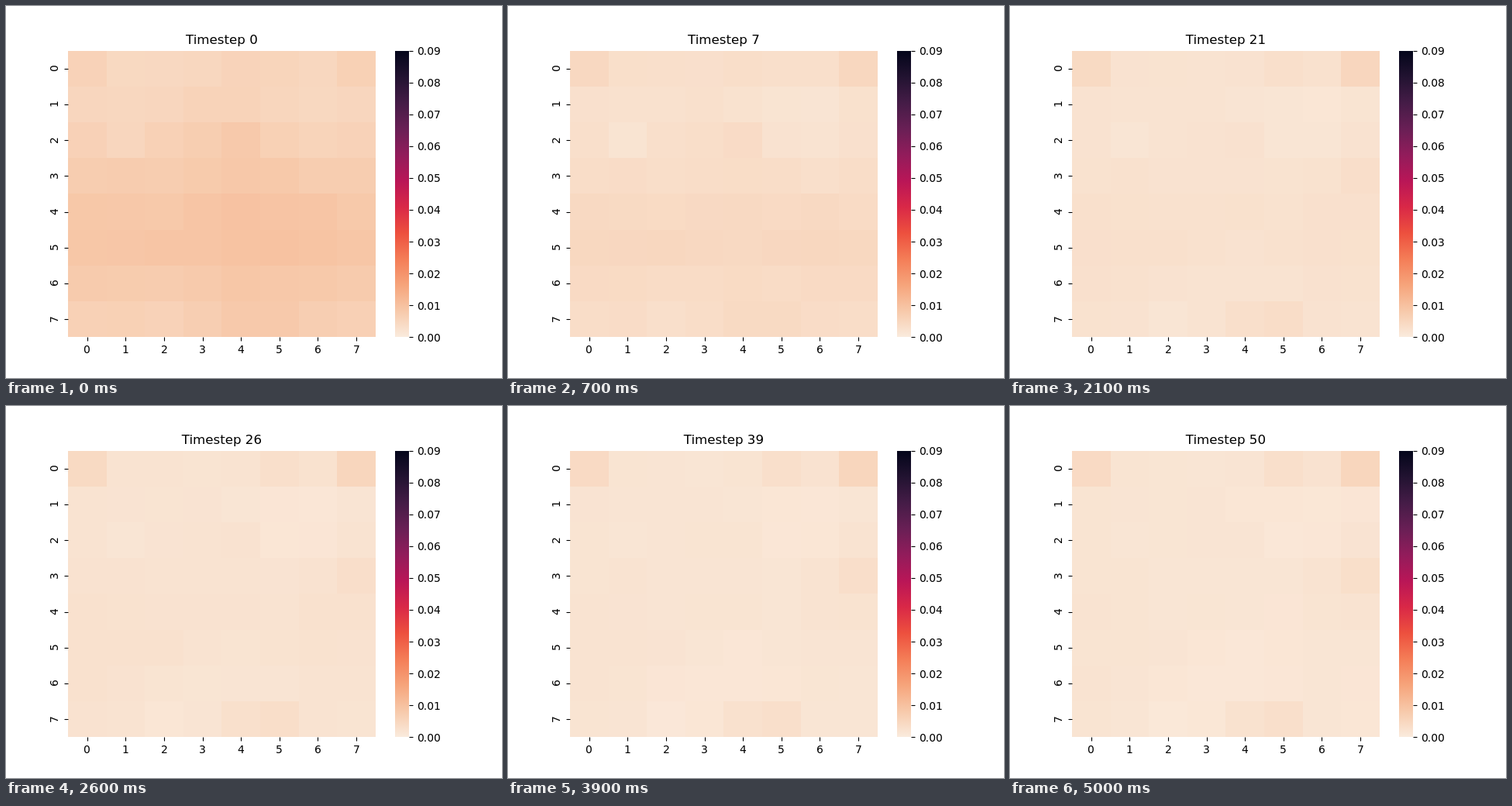
An HTML page that plays this animation: 640x480 px, repeating every 5100 ms.

```html
<!DOCTYPE html>
<html lang="en">
<head>
<meta charset="utf-8">
<title>Heatmap over time</title>
<style>
  html, body { margin: 0; width: 100%; height: 100%; overflow: hidden; background: #fff; }
  svg { display: block; font-family: "DejaVu Sans", sans-serif; font-size: 13.889px; }
</style>
</head>
<body>
<svg id="stage" width="640" height="480" viewBox="0 0 640 480">
  <defs><linearGradient id="scale" x1="0" y1="1" x2="0" y2="0"></linearGradient></defs>
  <rect width="640" height="480" fill="#fff"/>
  <text id="title" x="278.4" y="49" text-anchor="middle" font-size="16.667"></text>
</svg>
<script>
const N = 8, LAST = 50, BEND = 7, STEP = 100;
const X0 = 80, Y0 = 57.6, CW = 49.6, CH = 46.2, VMAX = 90;
const HALF_DIGIT = 4.42;
const svg = document.getElementById("stage");
const title = document.getElementById("title");

// Colour scale from light (0) to dark (1), evenly spaced
const ramp = ["faebdd", "f7c9aa", "f6a47b", "f47d57", "ed503e", "d92847",
              "b91657", "921c5b", "691f55", "451c47", "221331", "03051a"]
  .map(h => [0, 2, 4].map(i => parseInt(h.slice(i, i + 2), 16)));

// Hot and cold spots; heights in thousandths after the quick drop and at the end
const spots = [
  { r: 0, c: 0, w: 0.5, early: 1.8, late: 2.4 },
  { r: 0, c: 7, w: 0.5, early: 1.9, late: 3.9 },
  { r: 0, c: 5.3, w: 0.7, early: 0.2, late: 2 },
  { r: 2, c: 1, w: 0.5, early: -1, late: -0.2 },
  { r: 2, c: 4, w: 0.5, early: 0.9, late: 0.2 },
  { r: 1.6, c: 5.6, w: 1.2, early: -1.4, late: -0.6 },
  { r: 3, c: 7, w: 1.1, early: 0, late: 1.8 },
  { r: 6, c: 4, w: 1.3, early: 0, late: -0.7 },
  { r: 7, c: 2, w: 1.1, early: -0.3, late: -0.7 },
  { r: 7, c: 4.6, w: 0.7, early: 1, late: 2.3 }
];

const bump = (d, w) => Math.exp(-(d * d) / (w * w));

function random(seed) {
  return () => (seed = (seed * 16807) % 2147483647) / 2147483647;
}

function makeCell(r, c, grain) {
  let early = 3.4 + 1.2 * bump(r - 4.8, 1.2) - 0.8 * bump(r - 1, 1.2) + grain;
  let late = 1.75 - 0.07 * c + grain / 2;
  for (const s of spots) {
    const k = bump(Math.hypot(r - s.r, c - s.c), s.w);
    early += s.early * k;
    late += s.late * k;
  }
  const lift = 1.4 + 2.7 * Math.sin(Math.PI * r / 8.5) + 1.2 * bump(c - 4.4, 1.8);
  return { early, late, lift };
}

// Exponential fall from 1 at the start to 0 at the end of a span
function fall(n, span, tau) {
  const end = Math.exp(-span / tau);
  return (Math.exp(-n / tau) - end) / (1 - end);
}

function value({ early, late, lift }, n) {
  return n < BEND
    ? early + lift * fall(n, BEND, 4)
    : late + (early - late) * fall(n - BEND, LAST - BEND, 14);
}

function colour(v) {
  const p = Math.min(Math.max(v / VMAX, 0), 1) * (ramp.length - 1);
  const i = Math.min(Math.floor(p), ramp.length - 2);
  return `rgb(${ramp[i].map((c, k) => Math.round(c + (ramp[i + 1][k] - c) * (p - i)))})`;
}

function add(tag, attrs, text) {
  const el = document.createElementNS("http://www.w3.org/2000/svg", tag);
  for (const k in attrs) el.setAttribute(k, attrs[k]);
  if (text !== undefined) el.textContent = text;
  return svg.appendChild(el);
}

function box(x, y, width, height, fill) {
  return add("rect", { x, y, width, height, fill, "shape-rendering": "crispEdges" });
}

// Tick centred on pixel (x, y), reaching dx, dy away
function mark(x, y, dx, dy) {
  add("path", {
    d: `M${Math.round(x) + 0.5} ${Math.round(y) + 0.5}l${dx} ${dy}`,
    stroke: "#000", "stroke-width": 1.11
  });
}

const edgeX = i => Math.round(X0 + CW * i);
const edgeY = i => Math.round(Y0 + CH * i);
const rand = random(11);
const cells = [];

for (let r = 0; r < N; r++) {
  for (let c = 0; c < N; c++) {
    const x = edgeX(c), y = edgeY(r);
    const cell = makeCell(r, c, (rand() - 0.5) * 0.5);
    cell.el = box(x, y, edgeX(c + 1) - x, edgeY(r + 1) - y, "#fff");
    cells.push(cell);
  }
}

for (let i = 0; i < N; i++) {
  const x = X0 + CW * (i + 0.5), y = Y0 + CH * (i + 0.5);
  mark(x, 427, 0, 5);
  mark(80, y, -5, 0);
  add("text", { x: Math.round(x - HALF_DIGIT), y: 448 }, i);
  add("text", { transform: `translate(67 ${Math.round(y + HALF_DIGIT)}) rotate(-90)` }, i);
}

const gradient = document.getElementById("scale");
ramp.forEach((c, i) => gradient.appendChild(add("stop", {
  offset: i / (ramp.length - 1), "stop-color": `rgb(${c})`
})));
box(502, 58, 18, 369, "url(#scale)");

for (let i = 0; i < 10; i++) {
  const y = Y0 + CH * N * (1 - i / 9);
  mark(520, y, 5, 0);
  add("text", { x: 530, y: Math.round(y + 5.5), dx: "1 -1" }, (i / 100).toFixed(2));
}

let shown = -1;
function draw(ms) {
  const n = Math.floor(ms / STEP) % (LAST + 1);
  if (n === shown) return;
  shown = n;
  title.textContent = "Timestep " + n;
  for (const cell of cells) cell.el.setAttribute("fill", colour(value(cell, n)));
}

const start = performance.now();
function tick() {
  draw(performance.now() - start);
  requestAnimationFrame(tick);
}
tick();
</script>
</body>
</html>
```
